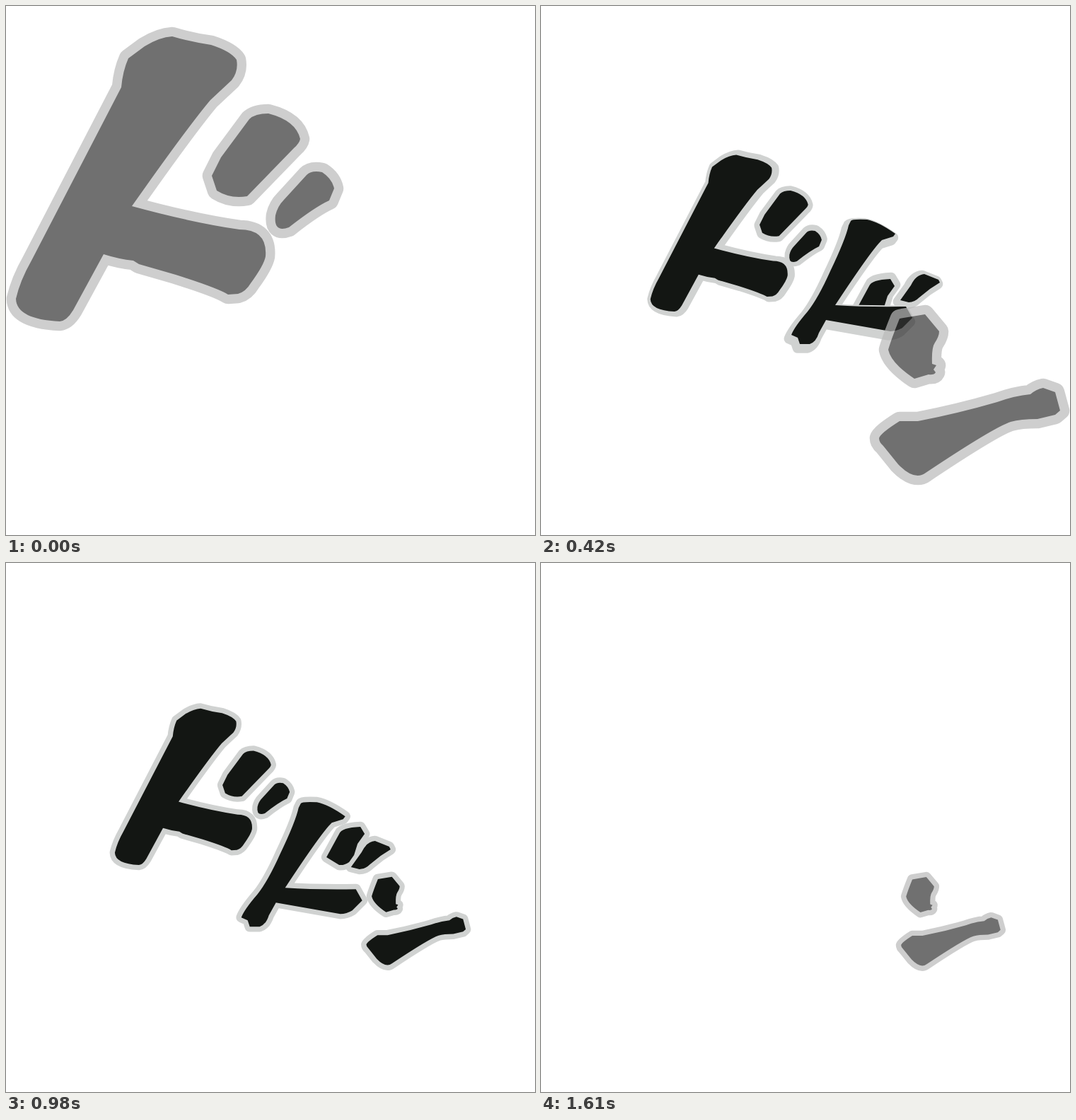
An HTML page for the animation above (1680 ms loop, 748 by 748 pixels).

```html
<!DOCTYPE html>
<html>
<head>
<meta charset="utf-8">
<style>
html, body { margin: 0; width: 100%; height: 100%; overflow: hidden; background: #fff; }
svg { display: block; width: 100vw; height: 100vh; }
path { stroke-linejoin: round; }
</style>
</head>
<body>
<svg viewBox="0 0 748 748"></svg>
<script>
const STEP = 70, STEPS = 24, BIG = 1.82, TURN = 27 * Math.PI / 180;

// unit: scale at which the paths are drawn; first/last: steps in which the letter is faded.
// kick: offset at the peak of the wobble; the outline follows a little less far.
const letters = [
  { pivot: [324.5, 404], unit: BIG, first: 0, last: 21, parts: [
    { d: 'M291 240L304 214L344 160Q352 152 371 152Q410 162 416 188Q415 194 407 201L341 269Q317 273 298 261Z',
      kick: [16, 7], spin: -1 },
    { d: 'M381 296Q384 283 393 274L425 239Q432 232 447 235Q461 244 464 258L457 275Q437 284 400 313Q378 321 381 296Z',
      kick: [20, 17] },
    { d: 'M173 74L196 57Q217 44 235 43Q262 51 290 55Q318 64 326 76Q329 92 319 105L289 133Q257 171 178 283Q262 306 330 316Q370 316 367 354Q365 366 346 392Q339 404 328 407L314 408Q300 399 240 380L188 365L180 360Q160 358 138 351L95 430Q86 445 76 446Q15 443 14 414Q20 388 36 360L163 115Q165 92 173 74Z',
      kick: [16, 0], rimKick: [18, -9] }
  ] },
  { pivot: [432, 426], unit: 1, first: 3, last: 22, parts: [
    { d: 'M453 416L471 383Q474 374 501 373L507 383L497 397L492 413L485 423Q478 428 471 427Z',
      kick: [-7, 13] },
    { d: 'M488 430L503 409Q510 394 522 393L542 401L544 405L530 414L515 426Q508 433 500 433Z',
      kick: [20, -14] },
    { d: 'M417 340Q418 337 440 338Q456 341 480 358L477 362L461 367Q447 380 395 459Q440 462 495 461L504 477L490 491Q482 496 473 496L382 480L372 498Q368 511 359 514L345 514L342 505L333 501Q337 490 356 468Q371 449 388 411Q410 365 414 346Z',
      kick: [21, -36] }
  ] },
  { pivot: [547, 454], unit: BIG, first: 6, last: 23, parts: [
    { d: 'M507 442L543 436L563 460Q563 467 557 476Q552 483 553 506L559 508L555 514L558 518Q556 522 548 521L528 527Q495 505 491 486Q495 472 507 442Z',
      kick: [-11, -4] },
    { d: 'M478 611Q480 604 507 587L533 587Q590 576 645 560Q670 551 692 549Q700 542 710 540L727 546L734 572L727 578L702 584Q678 584 664 588Q640 596 544 660Q528 672 505 648L484 622Q478 617 478 611Z',
      kick: [-11, 5] }
  ] }
];

const make = (tag, parent, attrs = {}) => {
  const el = parent.appendChild(document.createElementNS('http://www.w3.org/2000/svg', tag));
  for (const name in attrs) el.setAttribute(name, attrs[name]);
  return el;
};

// The last part of each letter is its main stroke and lies above the dots.
const svg = document.querySelector('svg');
for (const letter of letters) {
  letter.el = make('g', svg);
  for (const layer of [letter.parts.slice(0, -1), letter.parts.slice(-1)]) {
    for (const part of layer)
      part.rimEl = make('path', letter.el, { d: part.d, 'stroke-width': 14.6 * letter.unit });
    for (const part of layer) part.el = make('path', letter.el, { d: part.d });
  }
}

// A kick that swells, turns and dies away; it peaks at age 3.
function wobble([x, y], age, spin) {
  const t = Math.max(0, (age - 1) / 2);
  const size = (t * Math.exp(1 - t)) ** 2;
  const angle = (age - 3) * TURN * spin;
  const c = size * Math.cos(angle), s = size * Math.sin(angle);
  return [x * c - y * s, x * s + y * c];
}

function pose({ pivot: [px, py], unit, first, last, el, parts }, step) {
  const age = step - first;
  const faded = age === 0 || step === last;
  el.style.display = age < 0 || step > last ? 'none' : '';
  el.style.opacity = faded ? 0.7 : 1;
  const scale = (age === 0 ? BIG : age === 1 ? 0.9 : 1) / unit;
  const place = (path, [dx, dy], color) => {
    path.setAttribute('transform',
      `translate(${px + dx} ${py + dy}) scale(${scale}) translate(${-px} ${-py})`);
    path.style.fill = color;
  };
  for (const { el, rimEl, kick, rimKick = kick.map(v => v * 0.85), spin = 1 } of parts) {
    const rimColor = faded ? '#bababa' : '#d0d2d1';
    place(rimEl, wobble(rimKick, age, spin), rimColor);
    rimEl.style.stroke = rimColor;
    place(el, wobble(kick, age, spin), faded ? '#353535' : '#131613');
  }
}

function draw() {
  const step = Math.floor(performance.now() / STEP) % STEPS;
  for (const letter of letters) pose(letter, step);
  requestAnimationFrame(draw);
}
draw();
</script>
</body>
</html>
```
